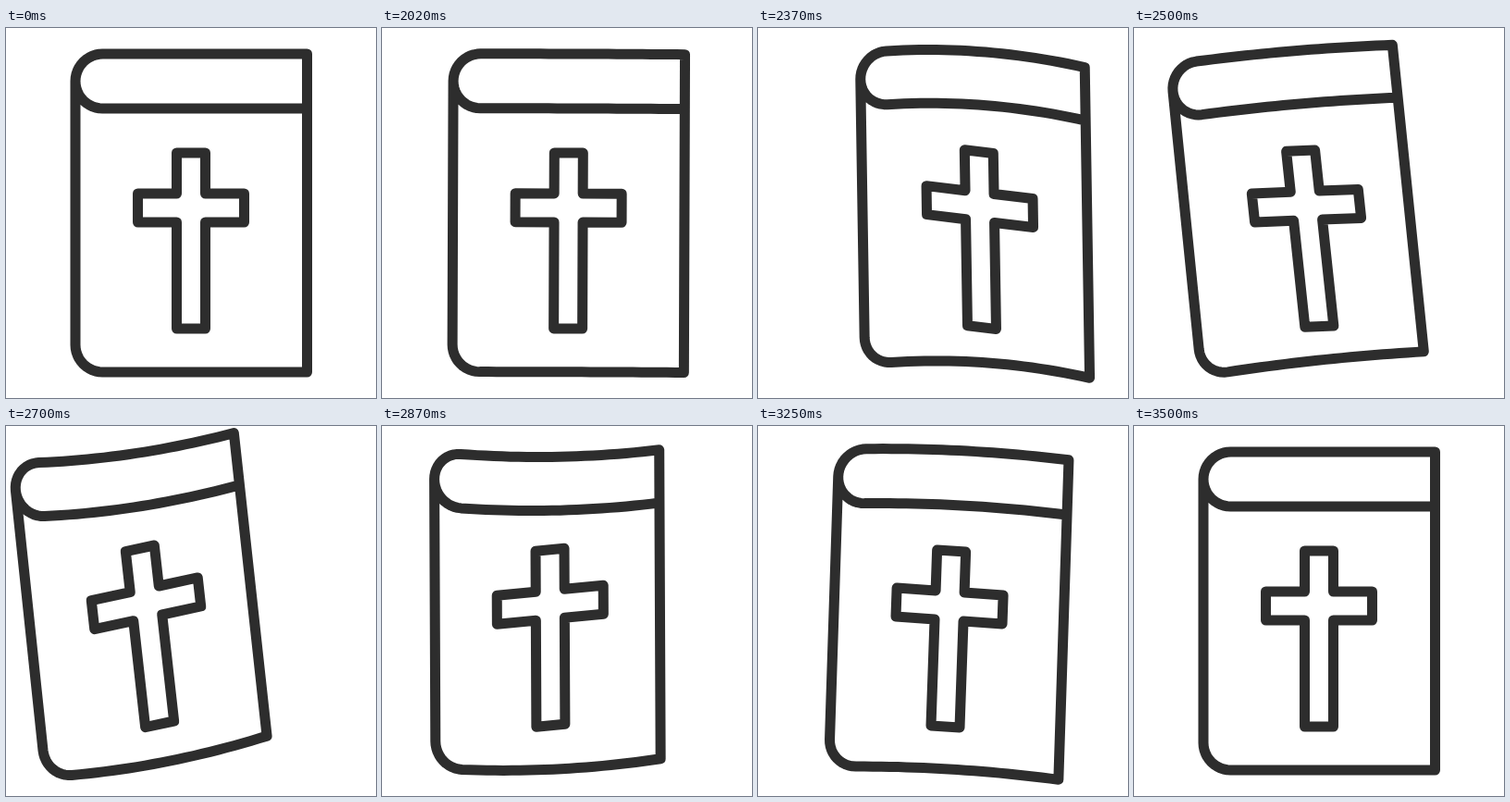
An HTML page that plays this animation: 400x400 px, repeating every 3520 ms.

```html
<!DOCTYPE html>
<html lang="en">
<head>
<meta charset="utf-8">
<title>Book wobble</title>
<style>
  html, body { margin: 0; width: 100%; height: 100%; overflow: hidden; background: #fff; }
  svg { display: block; width: 100vw; height: 100vh; }
  path { fill: none; stroke: #2d2d2d; stroke-width: 11; stroke-linecap: round; stroke-linejoin: round; }
</style>
</head>
<body>
<svg viewBox="0 0 400 400"><path id="book"/><path id="cross"/></svg>
<script>
const LOOP = 3520, STEP = 25, START = 2000, END = 3500;
const LEFT = 104.5, RIGHT = 325.5, TOP = 28, FOLD = 87, BOTTOM = 372, R = 29.5;
const SWING = [2250, 2640, 3083];

// Each track eases 0 -> right peak -> left peak -> small right peak -> 0.
const tracks = {
  x:           { v: [64.7, -54, 10.5] },
  squeeze:     { v: [-5.5, -10.5, -3] },
  topLeft:     { v: [-8.8, 13, -5], at: [2250, 2615, 3083] },
  topRight:    { v: [26.5, -22.5, 13.5], at: [2250, 2630, 3083] },
  bottomLeft:  { v: [-15.5, 6, -6] },
  bottomRight: { v: [20, -39, 14.5], at: [2250, 2640, 3110] },
  tilt:        { v: [0.072, -0.125, 0.055], at: [2180, 2600, 3050] },
  bend:        { v: [38, -28, 20], at: [2260, 2790, 3120] },
  crossX:      { v: [64.7, -49.5, 10.5], at: [2250, 2655, 3083] },
  crossY:      { v: [-1, -2.8, 0] },
  crossSlope:  { v: [0.19, -0.215, 0.1], at: [2250, 2710, 3100] }
};

const crossPoints = [
  [-15.5, 135], [15.5, 135], [15.5, 179], [57.5, 179], [57.5, 210], [15.5, 210],
  [15.5, 325], [-15.5, 325], [-15.5, 210], [-57.5, 210], [-57.5, 179], [-15.5, 179]
];

const mix = (a, b, p) => a + (b - a) * p;
const ease = p => (1 - Math.cos(Math.PI * p)) / 2;

function sample({ v, at = SWING }, t) {
  if (t <= START || t >= END) return 0;
  const times = [START, ...at, END], values = [0, ...v, 0];
  const i = times.findIndex(k => k > t) - 1;
  return mix(values[i], values[i + 1], ease((t - times[i]) / (times[i + 1] - times[i])));
}

const line = (x0, y0, x1, y1, n = 24) =>
  Array.from({ length: n + 1 }, (_, i) => [mix(x0, x1, i / n), mix(y0, y1, i / n)]);

const arc = (cx, cy, from, to, n = 24) =>
  Array.from({ length: n + 1 }, (_, i) => {
    const a = mix(from, to, i / n) * Math.PI;
    return [cx + R * Math.cos(a), cy + R * Math.sin(a)];
  });

const outline = [
  ...line(RIGHT, FOLD, LEFT, FOLD),
  ...arc(LEFT, TOP + R, 0.5, 1.5),
  ...line(LEFT, TOP, RIGHT, TOP),
  [RIGHT, BOTTOM],
  ...line(RIGHT, BOTTOM, LEFT, BOTTOM),
  ...arc(LEFT, BOTTOM - R, 0.5, 1, 12),
  [LEFT - R, TOP + R]
];

const toPath = points => "M" + points.map(p => p.map(n => n.toFixed(2)).join(" ")).join("L");

function warpBook([x, y], s) {
  const u = (x - LEFT) / (RIGHT - LEFT), v = (y - TOP) / (BOTTOM - TOP);
  const left = mix(s.topLeft, s.bottomLeft, v);
  const right = mix(s.topRight, s.bottomRight, v);
  const curve = s.bend * (u > 0 ? u * u - u : -u);
  return [x + s.x + s.squeeze * u + s.tilt * (200 - y), y + mix(left, right, u) + curve];
}

function warpCross([x, y], s) {
  return [200 + x + s.crossX + s.tilt * 1.08 * (200 - y), y + s.crossY + s.crossSlope * x];
}

const book = document.getElementById("book"), cross = document.getElementById("cross");

function draw(now) {
  const t = Math.floor((now % LOOP + 5) / STEP) * STEP;
  const s = {};
  for (const name in tracks) s[name] = sample(tracks[name], t);
  book.setAttribute("d", toPath(outline.map(p => warpBook(p, s))));
  cross.setAttribute("d", toPath(crossPoints.map(p => warpCross(p, s))) + "Z");
}

const t0 = performance.now();
function tick() {
  draw(performance.now() - t0);
  requestAnimationFrame(tick);
}
tick();
</script>
</body>
</html>
```
